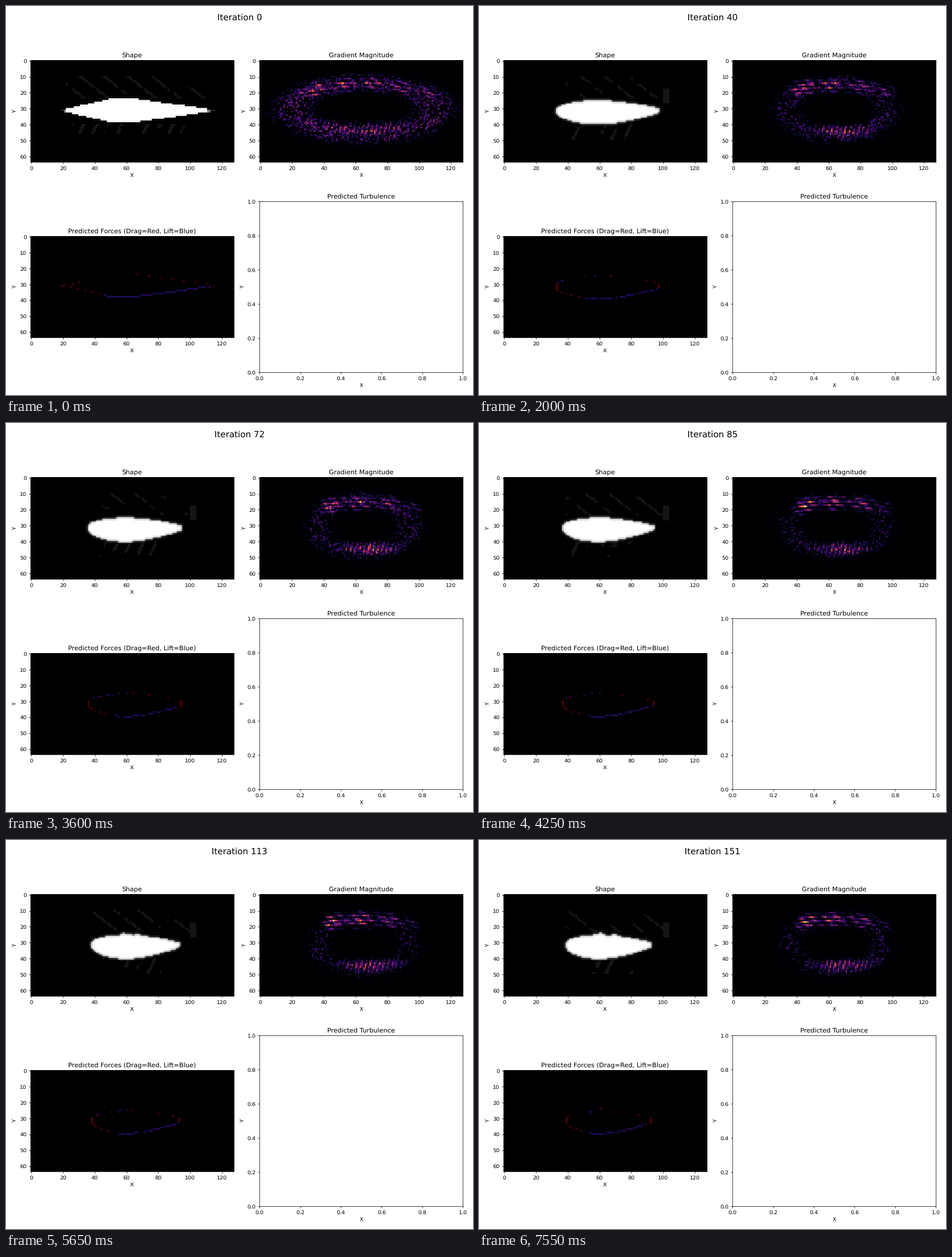
A matplotlib script for the animation above (7.6 s loop, 820 px wide and 683 px high).

```python
import numpy as np
import matplotlib.pyplot as plt
from matplotlib.animation import FuncAnimation

W, H, DPI = 820, 683, 820 / 12
FRAMES, INTERVAL = 152, 50
NX, NY = 128, 64
STEP = 4  # frames between two noise fields

plt.rcParams["text.hinting"] = "none"

xs = np.arange(NX)
X, Y = np.meshgrid(xs, np.arange(NY))


def blur(a):
    """Blur the last two axes with a 1-2-1 kernel."""
    for axis in (-1, -2):
        a = (np.roll(a, 1, axis) + 2 * a + np.roll(a, -1, axis)) / 4
    return a


GRAIN = np.random.default_rng(7).random((FRAMES // STEP + 2, NY, NX))
CLOUD = GRAIN
for _ in range(5):
    CLOUD = blur(CLOUD)
CLOUD = (CLOUD - CLOUD.mean()) / CLOUD.std()


def at(fields, k):
    i, r = divmod(k, STEP)
    return fields[i] + (fields[i + 1] - fields[i]) * r / STEP


def ease(k, tau):
    """Approach 1 exponentially, starting from 0."""
    return 1 - np.exp(-k / tau)


def bump(v, center, width):
    return np.exp(-((v - center) / width) ** 2)


def wave(v):
    return .5 + .5 * np.sin(2 * np.pi * v)


def extent(k):
    left = 19 + 8 * ease(k, 10) + 12.5 * ease(k, 65)
    right = 115 - 11 * ease(k, 8) - 12.5 * ease(k, 55)
    return left, right


def outline(k):
    """A thin wedge relaxes into a blunt drop, fullest at 40 % of its length."""
    left, right = extent(k)
    u = (xs - left) / (right - left)
    v = np.clip(u, 0, 1)
    wedge = np.clip(np.minimum(v / .34, (1 - v) / .55), 0, 1)
    nose = np.sqrt(1 - np.clip(1 - v / .4, 0, 1) ** 2)
    tail = 1 - .85 * np.clip((v - .4) / .6, 0, 1) ** 1.7
    p = wedge + (np.where(v < .4, nose, tail) - wedge) * ease(k, 12)
    top = 31.1 - (7.3 - 1.6 * ease(k, 25)) * p
    bottom = 31.1 + (7.3 + 1.4 * ease(k, 30)) * p
    # Two small humps grow on the upper side and drift right
    late = np.clip((k - 72) / 25, 0, 1)
    for x0 in (56, 64.5):
        top -= 1.1 * late * bump(xs, x0 + .057 * (k - 72), 1.4)
    return (u >= 0) & (u <= 1), v, top, bottom


def wisps(k):
    settle = ease(k, 12)
    cloud = at(CLOUD, k)
    reach = 50 - 18 * settle
    upper = (Y > 9 + np.clip(X - 75, 0, None) * .3) & (Y < 24) & (abs(X - 71) < reach)
    lower = (Y > 39) & (Y < 46 + 4 * settle) & (abs(X - 62) < reach - 13)
    diagonal = ((X - 1.3 * (Y - 10) - .06 * k) / 15) % 1 < .14
    steep = ((X + .5 * (Y - 40) + .03 * k) / 8) % 1 < .26
    edge = (abs(X - 101.5) < 2) & (abs(Y - 22) < 5) & (k > 20)
    faint = upper & diagonal & (cloud > -.5) | lower & steep & (cloud > .1) | edge
    return .085 * faint


def shape_image(k):
    inside, _, top, bottom = outline(k)
    t, b = np.rint(top), np.rint(bottom)
    mask = inside * (Y >= t) * (Y <= b) * np.clip((b - t) / 2, .2, 1)
    soft = .2 + .5 * ease(k, 12)
    return np.maximum(mask + (blur(mask) - mask) * soft, wisps(k))


def gradient_image(k):
    grain = at(GRAIN, k)
    settle = ease(k, 15)
    left, right = extent(k)
    strength = 1 - .4 * bump(k, 15, 14)

    # Bands above and below the body, bent like its outline
    bend = (xs - 66) ** 2 / 260
    y_top = 14 + 1.3 * settle + bend
    y_bottom = 43.5 + 1.3 * settle - bend

    # Bright spots every 18 columns, fading to the right
    window = np.clip((xs - left + 2) / 8, 0, 1) * np.clip((right + 10 - xs) / 12, 0, 1)
    spots = .45 + .55 * wave((xs - 35 - 10 * settle) / 18 + .25)
    amp_top = window * spots * (1.1 - .5 * (xs - left) / (right - left))
    amp_bottom = .75 * bump(xs, 60 + 9 * settle, 42 - 22 * settle)

    arcs = wave(Y / 2.6 - .0012 * (X - 60) ** 2 + .02 * k)
    slant = .3 + .7 * wave((X - 1.2 * Y - .15 * k) / 8)
    bars = wave(X / 2.8 + .1 * Y + .02 * k)
    upper = amp_top * bump(Y, y_top, 4.5) * arcs * slant * (.5 + .9 * grain)
    lower = amp_bottom * bump(Y, y_bottom, 4) * (.15 + .85 * bars) * (.1 + 1.1 * grain)

    # Dark specks in a ring around the body
    r = np.hypot((X - 65) / (37 + 20 * np.exp(-k / 22)), (Y - 30.5) / 21.5)
    specks = (1 - .4 * settle) * bump(r, .78, .25) * np.clip(grain - .52, 0, 1)
    return np.clip(strength * np.maximum(upper + lower, specks) - .05, 0, 1)


def force_image(k):
    img = np.zeros((NY, NX, 3))
    inside, v, top, bottom = outline(k)
    t, b = np.rint(top).astype(int), np.rint(bottom).astype(int)
    settle = ease(k, 12)
    gate = at(GRAIN, k)[0]
    red, blue, violet = (.33, 0, .02), (.1, .04, .32), (.2, .02, .32)

    def dots(where, line, color):
        sel = inside & where
        img[line[sel], xs[sel]] = color

    step_t, step_b = t != np.roll(t, -1), b != np.roll(b, -1)
    dots((v > .28) & (v < .94) & (gate >= .25 * settle), b, blue)
    dots((v > .55) & step_b, b, violet)
    dots((v < .28) & step_b, b, red)
    dots((v < .42) & (gate > 1 - .35 * settle), t, blue)
    dots(step_t & ((v < .15) | (v > .42)) & (gate > .5 * settle), t, red)
    # Both tips: the full height of the blunt ends
    for x in xs[inside][[0, -1]]:
        img[t[x]:b[x] + 1, x] = red
    return img


fig = plt.figure(figsize=((W + .1) / DPI, (H + .1) / DPI), dpi=DPI, facecolor="white")
heading = fig.suptitle("Iteration 0", fontsize=16)


def panel(title, x, y, w, h):
    ax = fig.add_axes([x / W, 1 - (y + h) / H, w / W, h / H])
    ax.set(title=title, xlabel="X", ylabel="Y")
    return ax


def image_panel(title, x, y, data, **style):
    ax = panel(title, x, y, 357, 178.5)
    im = ax.imshow(data, aspect="auto", interpolation="nearest", **style)
    ax.set_xticks(range(0, 121, 20))
    ax.set_yticks(range(0, 61, 10))
    return im


shape = image_panel("Shape", 42.8, 95.4, shape_image(0), cmap="gray", vmin=0, vmax=1)
gradient = image_panel("Gradient Magnitude", 445.2, 95.4, gradient_image(0),
                       cmap="inferno", vmin=0, vmax=1)
forces = image_panel("Predicted Forces (Drag=Red, Lift=Blue)", 42.8, 403.9, force_image(0))
panel("Predicted Turbulence", 445.2, 343, 357, 300)


def update(k):
    heading.set_text(f"Iteration {k}")
    shape.set_data(shape_image(k))
    gradient.set_data(gradient_image(k))
    forces.set_data(force_image(k))
    return heading, shape, gradient, forces


anim = FuncAnimation(fig, update, frames=FRAMES, interval=INTERVAL,
                     repeat=True, repeat_delay=0, blit=False)
plt.show()
```
